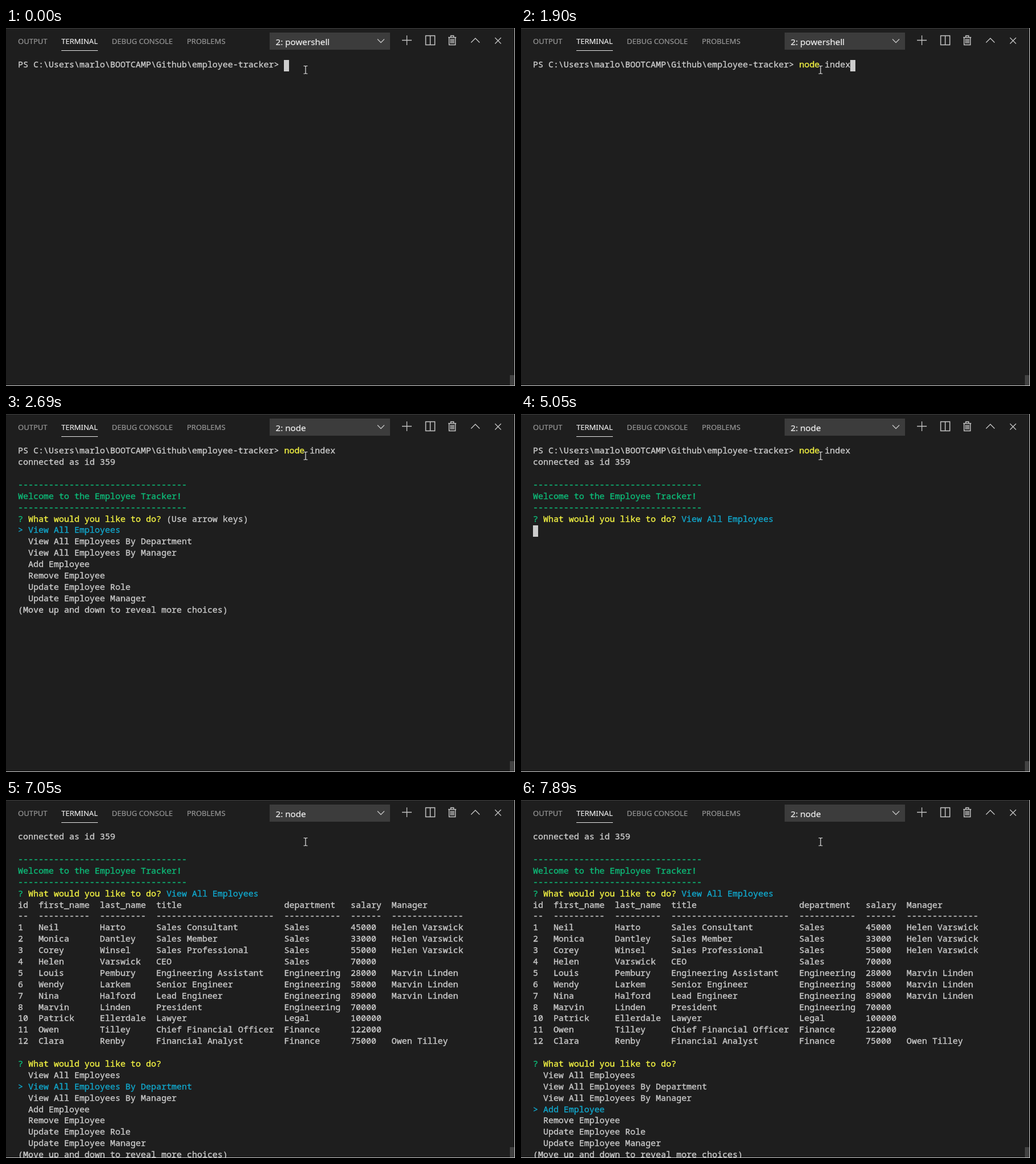
Recreate the animation shown at these times as an HTML page with a canvas. Size 892 by 627 pixels, loop 8000 ms.

```html
<!DOCTYPE html>
<html lang="en">
<head>
<meta charset="utf-8">
<title>Employee Tracker terminal</title>
<style>
html, body { margin: 0; width: 100%; height: 100%; overflow: hidden; background: #1e1e1e; }
canvas { display: block; }
</style>
</head>
<body>
<canvas id="stage" width="892" height="627"></canvas>
<script>
const ctx = document.getElementById('stage').getContext('2d');
const LOOP = 8000, CELL = 8.97, ROW = 19.89, LEFT = 21, TOP = 55.7;
const FG = '#cccccc', GREEN = '#0dbc79', YELLOW = '#f5f543', CYAN = '#11a8cd';
const MONO = '14.95px "Noto Sans Mono", "DejaVu Sans Mono", monospace';
const SANS = 'px "Noto Sans", "Open Sans", sans-serif';

const PROMPT = 'PS C:\\Users\\marlo\\BOOTCAMP\\Github\\employee-tracker> ';
const QUESTION = 'What would you like to do?';
const MENU = ['View All Employees', 'View All Employees By Department',
  'View All Employees By Manager', 'Add Employee', 'Remove Employee',
  'Update Employee Role', 'Update Employee Manager'];
const COLUMNS = [0, 4, 16, 27, 52, 65, 73];
const WIDTHS = [2, 10, 9, 23, 11, 6, 14];
const TABLE = [
  'id|first_name|last_name|title|department|salary|Manager',
  WIDTHS.map(n => '-'.repeat(n)).join('|'),
  '1|Neil|Harto|Sales Consultant|Sales|45000|Helen Varswick',
  '2|Monica|Dantley|Sales Member|Sales|33000|Helen Varswick',
  '3|Corey|Winsel|Sales Professional|Sales|55000|Helen Varswick',
  '4|Helen|Varswick|CEO|Sales|70000',
  '5|Louis|Pembury|Engineering Assistant|Engineering|28000|Marvin Linden',
  '6|Wendy|Larkem|Senior Engineer|Engineering|58000|Marvin Linden',
  '7|Nina|Halford|Lead Engineer|Engineering|89000|Marvin Linden',
  '8|Marvin|Linden|President|Engineering|70000',
  '10|Patrick|Ellerdale|Lawyer|Legal|100000',
  '11|Owen|Tilley|Chief Financial Officer|Finance|122000',
  '12|Clara|Renby|Financial Analyst|Finance|75000|Owen Tilley'
];
// [time, characters typed]
const KEYS = [[550, 2], [830, 4], [1110, 5], [1370, 6], [1497, 7], [1623, 8], [1750, 9], [1900, 10]];

function box(x, y, w, h, color) {
  ctx.fillStyle = color;
  ctx.fillRect(x, y, w, h);
}

function stroke(path, color = '#c5c5c5', width = 1.3) {
  ctx.strokeStyle = color;
  ctx.lineWidth = width;
  ctx.stroke(new Path2D(path));
}

// A hairline outline gives the text a slightly heavier weight.
function ink(text, x, y, font, color, weight) {
  ctx.font = font;
  ctx.fillStyle = ctx.strokeStyle = color;
  ctx.lineWidth = weight;
  ctx.fillText(text, x, y);
  ctx.strokeText(text, x, y);
}

function label(text, x, y, size, color) {
  ink(text, x, y, size + SANS, color, 0.2);
}

// Writes text on the terminal's character grid.
function put(row, col, text, color = FG) {
  const y = Math.round(69.2 + row * ROW);
  [...text].forEach((c, i) => {
    if (c !== ' ') ink(c, LEFT + (col + i) * CELL, y, MONO, color, 0.35);
  });
}

function caret(row, col) {
  box(Math.round(LEFT + col * CELL), Math.round(TOP + row * ROW), 9, 20, FG);
}

function header(title) {
  box(0, 0, 892, 1, '#414141');
  label('OUTPUT', 21, 28, 13, '#969696');
  label('TERMINAL', 97, 28, 13, '#e7e7e7');
  label('DEBUG CONSOLE', 185.5, 28, 13, '#969696');
  label('PROBLEMS', 317, 28, 13, '#969696');
  box(97, 39, 64, 1, '#e7e7e7');
  box(462, 8, 211, 30, '#3c3c3c');
  label('2: ' + title, 472.5, 30, 15.2, '#f0f0f0');
  stroke('M651 19.5l6 6 6-6');
  stroke('M702.5 13v17M694 21.5h17');
  stroke('M735.5 13.5h16v16h-16zM743.5 13.5v16', '#c5c5c5', 1.5);
  stroke('M775 16.5h14M779.5 16v-2.5h5v2.5M776.5 17v12.5h11v-12.5M779.5 19v8M782 19v8M784.5 19v8', '#c5c5c5', 1.5);
  stroke('M815 25.5l7.5-7.5 7.5 7.5');
  stroke('M857 17l10.5 10.5M867.5 17l-10.5 10.5');
}

function welcome(row) {
  const rule = '-'.repeat(33);
  put(row, 0, 'connected as id 359');
  put(row + 2, 0, rule, GREEN);
  put(row + 3, 0, 'Welcome to the Employee Tracker!', GREEN);
  put(row + 4, 0, rule, GREEN);
}

function ask(row, tail = '', color = FG) {
  put(row, 0, '?', GREEN);
  put(row, 2, QUESTION, YELLOW);
  put(row, 29, tail, color);
}

function menu(row, picked, hint) {
  ask(row, hint);
  MENU.forEach((item, i) => {
    const on = i === picked;
    put(row + 1 + i, 0, (on ? '> ' : '  ') + item, on ? CYAN : FG);
  });
  put(row + 8, 0, '(Move up and down to reveal more choices)');
}

function shell(t) {
  const typed = KEYS.reduce((n, [at, count]) => t >= at ? count : n, 0);
  put(0, 0, PROMPT);
  put(0, 52, 'node'.slice(0, typed), YELLOW);
  put(0, 57, 'index'.slice(0, Math.max(0, typed - 5)));
  if (t < 2410) caret(0, 52 + typed);
  else if (t < 2690) caret(1, 0);
  else {
    welcome(1);
    if (t < 5050) menu(6, 0, '(Use arrow keys)');
    else {
      ask(6, MENU[0], CYAN);
      caret(7, 0);
    }
  }
}

function listing(t) {
  welcome(0);
  ask(5, MENU[0], CYAN);
  TABLE.forEach((line, r) =>
    line.split('|').forEach((cell, c) => put(6 + r, COLUMNS[c], cell)));
  const picked = [7050, 7480, 7890].filter(at => t >= at).length;
  menu(20, picked, picked ? '' : '(Use arrow keys)');
}

function pointer() {
  const beam = 'M521.5 66.5h2.5l1 1 1-1h2.5M525 67v12M521.5 80h2.5l1-1 1 1h2.5';
  stroke(beam, '#1e1e1e', 3);
  stroke(beam, '#e4e4e4', 1.2);
}

function draw(now) {
  const t = now % LOOP;
  box(0, 0, 892, 627, '#1e1e1e');
  header(t < 2410 ? 'powershell' : 'node');
  if (t < 5200) shell(t);
  else listing(t);
  box(883, 608, 8, 18, '#424242');
  box(891, 0, 1, 627, '#cfcfcf');
  box(0, 626, 892, 1, '#cfcfcf');
  pointer();
}

let start;
function tick(now) {
  start ??= now;
  draw(now - start);
  requestAnimationFrame(tick);
}
requestAnimationFrame(tick);
</script>
</body>
</html>
```
